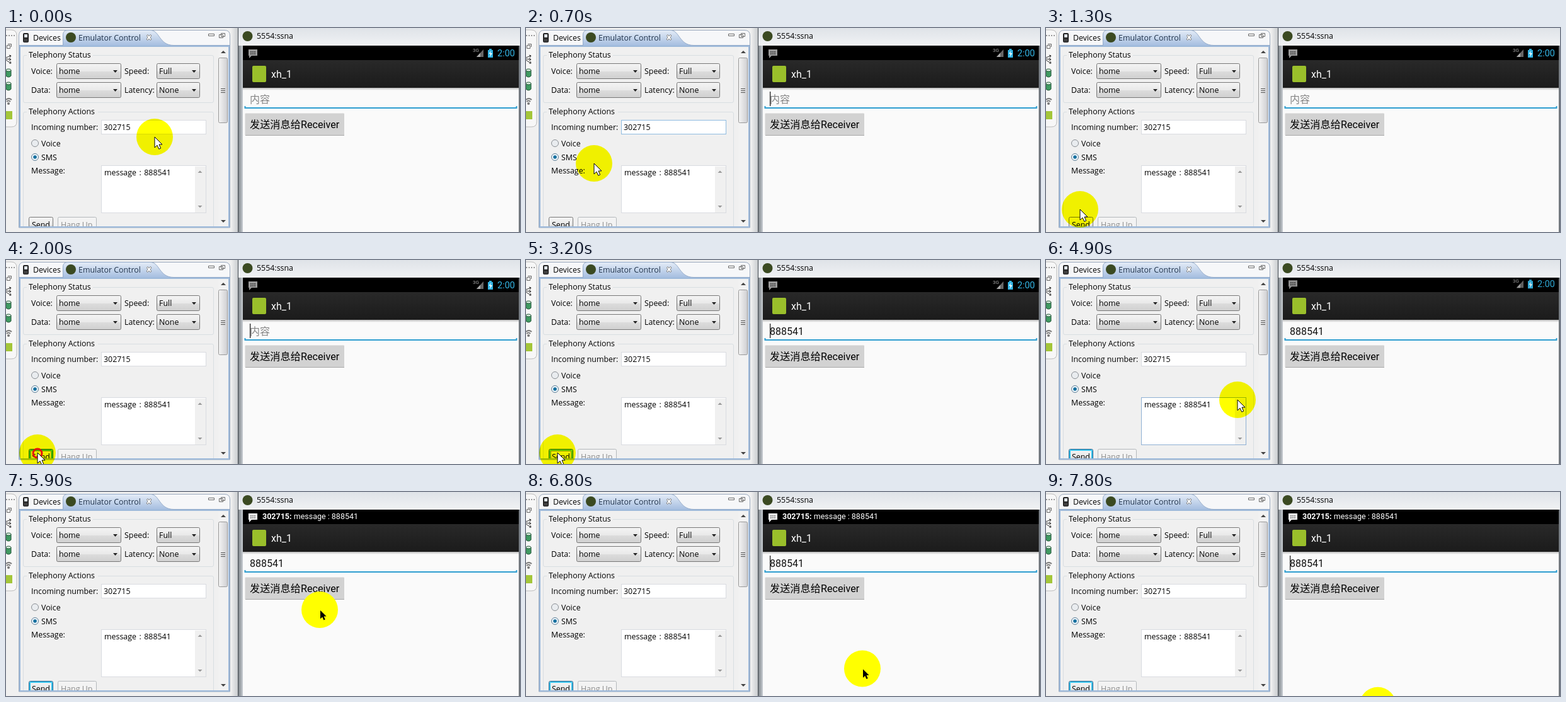
An HTML page that plays this animation: 816x324 px, repeating every 7.9 s.

```html
<!DOCTYPE html>
<html lang="en">
<head>
<meta charset="utf-8">
<title>Emulator message demo</title>
<style>
  html, body { margin: 0; width: 100%; height: 100%; overflow: hidden; background: #f0f0f0; }
  svg { display: block; width: 816px; height: 324px; isolation: isolate; }
  .ui { font: 12.4px "Open Sans", "Noto Sans", sans-serif; }
  .app { font: 16px Roboto, "Noto Sans CJK SC", "Noto Sans CJK", sans-serif; }
  .line { fill: none; stroke: #d8dee2; }
  .field { fill: #fff; stroke: #d9dbe0; }
  .combo { fill: url(#button); stroke: #777; }
</style>
</head>
<body>
<svg viewBox="0 0 816 324">
  <defs>
    <linearGradient id="button" x2="0" y2="1">
      <stop offset="0" stop-color="#f4f4f4"/><stop offset=".5" stop-color="#e9e9e9"/>
      <stop offset=".52" stop-color="#dcdcdc"/><stop offset="1" stop-color="#d0d0d0"/>
    </linearGradient>
    <linearGradient id="tab" x2="0" y2="1">
      <stop offset="0" stop-color="#e4ecf7"/><stop offset="1" stop-color="#a0bade"/>
    </linearGradient>
    <linearGradient id="thumb"><stop offset="0" stop-color="#f4f4f4"/><stop offset="1" stop-color="#cfcfd2"/></linearGradient>
    <linearGradient id="shadow"><stop offset="0" stop-color="#f0f0f0"/><stop offset="1" stop-color="#c9cccf"/></linearGradient>
    <linearGradient id="edge"><stop offset="0" stop-color="#73797f"/><stop offset="1" stop-color="#c9ced3"/></linearGradient>
    <linearGradient id="title" x2="0" y2="1"><stop offset="0" stop-color="#dfe3e8"/><stop offset="1" stop-color="#f0f2f4"/></linearGradient>
    <linearGradient id="bar" x2="0" y2="1"><stop offset="0" stop-color="#292929"/><stop offset="1" stop-color="#1b1b1b"/></linearGradient>
    <linearGradient id="shade" x2="0" y2="1"><stop offset="0" stop-color="#bbb"/><stop offset="1" stop-color="#fafafa"/></linearGradient>
    <clipPath id="body"><path d="M22 29H354V315H22Z"/></clipPath>
    <clipPath id="status"><path d="M376 28H814V51H376Z"/></clipPath>
    <g id="bubble"><path d="M385 34H399V44H390L386 48V44H385Z"/><path d="M388 38H396M388 41H396" stroke="#000" stroke-dasharray="2 1"/></g>
    <g id="db"><path d="M0 2V11Q4 15 8 11V2" fill="#3f9a62" stroke="#24553a"/><ellipse cx="4" cy="2" rx="4" ry="2" fill="#d9efdf" stroke="#24553a"/></g>
  </defs>

  <rect width="816" height="324" fill="#f0f0f0"/>

  <!-- side toolbar -->
  <path d="M0 3H8Q17 3 17 12V149Q17 157 9 157H0" fill="#f7f7f7" stroke="#bbb"/>
  <path d="M0 12H15" stroke="#999" stroke-width="2" stroke-dasharray="2 2"/>
  <path d="M1.500 27.500H6.500V32.500H1.500ZM3 25.500H8.500V30" fill="none" stroke="#666"/>
  <path d="M0 47L8 44M0 49L8 50M0 51L8 56M5 43L8 44L6 47M5 48L8 50L5 52M7 53L8 56L5 56" fill="none" stroke="#333"/>
  <use href="#db" y="65"/><use href="#db" y="86"/>
  <path d="M0 114Q4 110 9 114M1 117Q4 114 7 117" fill="none" stroke="#777" stroke-width="2"/>
  <circle cx="4" cy="120" r="2" fill="#777"/>
  <rect y="132" width="10" height="13" fill="#a4c639"/>

  <!-- control panel -->
  <path d="M20.500 317V12Q20.500 3.500 29 3.500H347Q355.500 3.500 355.500 12V317Z" fill="#f6f7f9" stroke="#9aa9bd"/>
  <path d="M90.500 28V11Q90.500 3.500 98 3.500H229C244 3.500 243 27.500 266 27.500H355V30H21V27.500H90.500" fill="url(#tab)" stroke="#94abca"/>
  <path d="M22 29H354V316H22Z" fill="#f0f0f0" stroke="#9db9da" stroke-width="2"/>
  <rect x="27" y="8" width="9" height="15" rx="2" fill="#222"/>
  <path d="M29 10H34V15H29Z" fill="#dfe6ec"/><path d="M29 18H34M29 20.500H34" stroke="#aaa" stroke-dasharray="1 1"/>
  <circle cx="103" cy="15" r="8" fill="#3b4a22"/>
  <path d="M223.500 12L225 10.500L227 13L229 10.500L231 12L229 15L231 18L229 19.500L227 17L225 19.500L223 18L225 15Z" fill="#fff" stroke="#777" stroke-width=".9"/>
  <path d="M321.500 9.500H330.500V12.500H321.500ZM341.500 8.500H347.500V13.500H341.500ZM338.500 10.500H344.500V15.500H338.500Z" fill="#fff" stroke="#666"/>

  <g class="ui">
    <text x="43" y="19.500">Devices</text><text x="115" y="19.500" fill="#23354d">Emulator Control</text>
    <g clip-path="url(#body)">
      <path class="line" d="M33 43.500H30Q27.500 43.500 27.500 46V116Q27.500 118.500 30 118.500H327Q329.500 118.500 329.500 116V46Q329.500 43.500 327 43.500H138M33 133.500H30Q27.500 133.500 27.500 136V324M146 133.500H327Q329.500 133.500 329.500 136V324"/>
      <text x="36" y="47">Telephony Status</text><text x="36" y="137">Telephony Actions</text>
      <text x="40" y="73">Voice:</text><text x="188" y="73">Speed:</text>
      <text x="40" y="103">Data:</text><text x="188" y="103">Latency:</text>
      <g id="combos"></g>
      <text x="40" y="162">Incoming number:</text>
      <rect id="number" class="field" x="151.500" y="146.500" width="166" height="22"/>
      <text x="155" y="162">302715</text>
      <circle cx="46" cy="183" r="5.500" fill="#e9ecef" stroke="#8a8f94"/>
      <circle cx="46" cy="205" r="5.500" fill="#eef5fa" stroke="#5f7f95"/><circle cx="46" cy="205" r="2.800" fill="#17709f"/>
      <text x="56" y="187.500">Voice</text><text x="56" y="209.500">SMS</text><text x="40" y="231">Message:</text>
      <rect id="area" class="field" x="151.500" y="218.500" width="166" height="75"/>
      <path d="M300 220H317V293H300Z" fill="#f0f0f0"/>
      <path d="M304.500 230L308 226.500L311.500 230ZM304.500 282L308 285.500L311.500 282Z" fill="#999"/>
      <text x="156" y="234" word-spacing="1.300">message : 888541</text>
      <rect id="send" class="combo" x="36.500" y="300.500" width="38" height="24" rx="2"/>
      <rect id="glow" x="38" y="302" width="35" height="24" rx="1" fill="none" stroke="#35c4ef" stroke-width="2"/>
      <rect id="focus" x="39.500" y="303.500" width="32" height="20" fill="none" stroke="#444" stroke-dasharray="1 1"/>
      <text x="41" y="317">Send</text>
      <rect x="82.500" y="300.500" width="61" height="24" rx="2" fill="#f3f3f3" stroke="#b4b8bb"/>
      <text x="87" y="317" fill="#8b8b8b">Hang Up</text>
      <path d="M337 31H353V315H337Z" fill="#f2f2f2"/>
      <rect x="337.500" y="47.500" width="14" height="103" rx="2" fill="url(#thumb)" stroke="#999"/>
      <path d="M341 96.500H348M341 99.500H348M341 102.500H348" stroke="#555"/>
      <path d="M341 40L345 36L349 40ZM341 305L345 309L349 305Z" fill="#444"/>
    </g>
  </g>

  <!-- phone window -->
  <rect x="357" width="11" height="324" fill="url(#shadow)"/>
  <rect x="368" width="448" height="28" fill="url(#title)"/>
  <rect x="368" y="28" width="8" height="296" fill="url(#edge)"/>
  <rect x="814" y="28" width="2" height="296" fill="#73797f"/>
  <path d="M368.500 0V324" stroke="#444a50"/>
  <circle cx="383.500" cy="13" r="8" fill="#3b4a22"/>
  <text class="ui" x="398" y="17">5554:ssna</text>
  <rect x="376" y="28" width="438" height="296" fill="#fafafa"/>
  <rect x="376" y="28" width="438" height="24"/>
  <rect x="376" y="51" width="438" height="44" fill="url(#bar)"/>
  <rect x="376" y="95" width="438" height="4" fill="url(#shade)"/>
  <g class="app">
    <g clip-path="url(#status)">
      <g id="icons">
        <use href="#bubble" fill="#999"/>
        <text x="741" y="38" font-size="8" fill="#aaa">3G</text>
        <path d="M747 46L758 34V46Z" fill="#666"/><path d="M747 46L753 39.500V46Z" fill="#aaa"/>
        <path d="M767 33H771V35H773V47H765V35H767Z" fill="#33b5e5"/>
        <path d="M770 36L766.500 41H769L768 46L772 40H769Z" fill="#fff"/>
        <text x="780" y="44.500" font-size="14.500" fill="#33b5e5">2:00</text>
      </g>
      <g id="ticker" fill="#fff">
        <use href="#bubble"/>
        <text x="407" y="43" font-size="12.500"><tspan font-weight="bold">302715:</tspan> message : 888541</text>
      </g>
    </g>
    <rect x="391" y="60" width="22" height="26" rx="2" fill="#9abf2b"/>
    <text x="421" y="79" fill="#fff">xh_1</text>
    <path d="M379.500 124V127H810.500V124" fill="none" stroke="#2d9dd0" stroke-width="2"/>
    <text id="content" x="387" y="119"></text>
    <rect id="caret" x="387" y="101" width="1.300" height="23" fill="#222"/>
    <rect x="379.500" y="135.500" width="157.500" height="35" rx="1" fill="#d2d2d2"/>
    <path d="M380 170.500H537" stroke="#a8a8a8"/>
    <text x="387" y="159" font-size="16.200">发送消息给Receiver</text>
  </g>

  <!-- pointer -->
  <circle id="disc" r="29" fill="#ff0"/>
  <circle id="ring" fill="none" stroke="#e8120c" stroke-width="3"/>
  <path id="arrow" d="M0 0V17L4 13.200L6.800 19.300L9.700 18L7 12H12Z"/>
</svg>
<script>
const LOOP = 7900, STEP = 100;
const $ = id => document.getElementById(id);
const set = (id, attrs) => { for (const k in attrs) $(id).setAttribute(k, attrs[k]); };
const show = (id, on) => set(id, { visibility: on ? "visible" : "hidden" });
const clamp = v => Math.max(0, Math.min(1, v));

// time, x, y
const path = [
  [0, 236, 173], [200, 214, 126], [500, 160, 172], [700, 108, 215], [800, 70, 233],
  [1300, 54, 288], [1700, 50, 306], [4400, 50, 306], [4900, 304, 222], [5200, 410, 198],
  [5900, 498, 187], [6700, 530, 270], [7100, 546, 312], [7500, 526, 338], [7900, 527, 339]
];

$("combos").innerHTML = [[80, 57, 103, "home"], [239, 57, 69, "Full"], [80, 87, 103, "home"], [239, 87, 69, "None"]]
  .map(([x, y, w, label]) => `<rect class="combo" x="${x + .5}" y="${y - .5}" width="${w - 1}" height="24" rx="2"/>
    <text x="${x + 4}" y="${y + 16}">${label}</text>
    <path d="M${x + w - 13} ${y + 10}h7l-3.500 4z" fill="#222"/>`).join("");

function pointer(t) {
  const i = path.findIndex(p => p[0] > t);
  const [t0, x0, y0] = path[i - 1], [t1, x1, y1] = path[i];
  const k = (t - t0) / (t1 - t0);
  return [x0 + (x1 - x0) * k, y0 + (y1 - y0) * k];
}

function caretOn(t) {
  if (t < 2700) return (t + 400) % 1000 < 500 && t >= 600;
  return t < 3800 || t >= 4400 && (t - 4400) % 1000 < 500;
}

function draw(t) {
  const [x, y] = pointer(t), onPhone = x > 368;
  set("disc", { cx: x, cy: y, style: `mix-blend-mode: ${onPhone ? "normal" : "multiply"}` });
  set("arrow", {
    transform: onPhone ? `translate(${x + 1} ${y + 1}) scale(.8)` : `translate(${x} ${y})`,
    fill: onPhone ? "#000" : "#fff", stroke: onPhone ? "none" : "#000"
  });
  show("ring", t >= 1900 && t < 2300);
  set("ring", { cx: 50, cy: 307, r: 4 + Math.max(0, t - 1900) * .03 });

  // hover, focus and default-button states
  set("number", { style: t < 900 && t > 0 ? "stroke:#8fbbe0" : "" });
  set("area", { style: t >= 4700 && t < 5200 ? "stroke:#8fb0d4" : "" });
  const active = t >= 1900;
  set("send", { style: active ? "stroke:#2c628b" : "" });
  set("glow", { opacity: active ? .8 + .2 * Math.cos((t - 4900) / 1000 * Math.PI * 2) : 0 });
  show("focus", t >= 2000 && t < 4500);

  const sent = t >= 3200;
  $("content").textContent = sent ? "888541" : "内容";
  set("content", { fill: sent ? "#111" : "#858585" });
  show("caret", caretOn(t));

  const k = clamp((t - 4800) / 600), p = k * k * (3 - 2 * k);
  set("icons", { transform: `translate(0 ${-24 * p})`, opacity: 1 - p });
  set("ticker", { transform: `translate(0 ${24 * (1 - p)})`, opacity: p });
}

const start = performance.now();
function frame() {
  const t = (performance.now() - start) % LOOP;
  draw(Math.floor(t / STEP) * STEP);
  requestAnimationFrame(frame);
}
frame();
</script>
</body>
</html>
```
